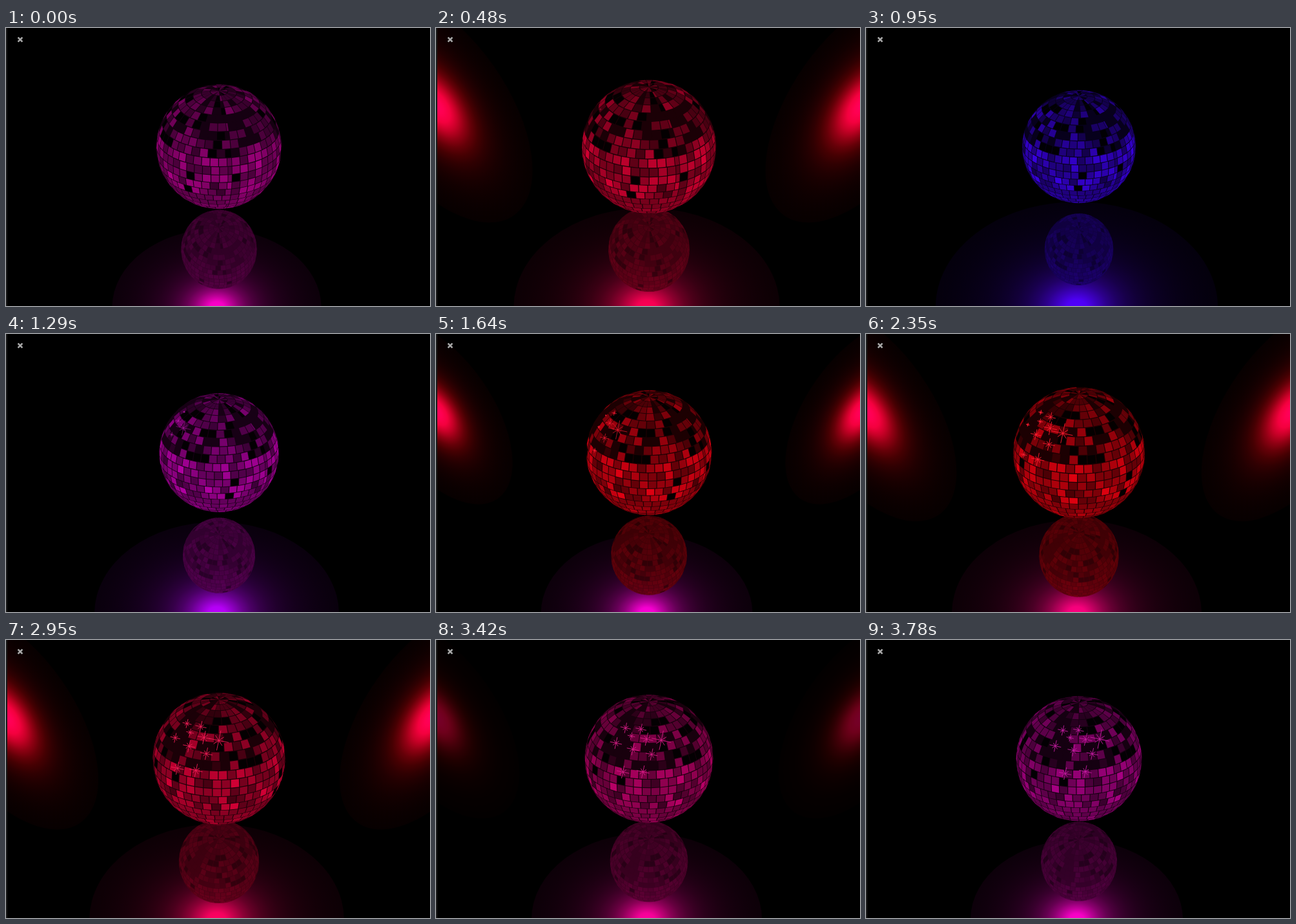
Write an HTML page that moves like this. It is 657x432 px and loops after 3.88 s.

```html
<!DOCTYPE html>
<html lang="en">
<head>
<meta charset="utf-8">
<title>Disco ball</title>
<style>
html, body { margin: 0; width: 100%; height: 100%; overflow: hidden; background: #000; }
svg { display: block; width: 657px; height: 432px; }
</style>
</head>
<body>
<svg viewBox="0 0 657 432">
  <defs>
    <radialGradient id="lampFill"></radialGradient>
    <radialGradient id="beamFill"></radialGradient>
  </defs>
  <rect width="657" height="432" fill="#000"/>
  <g id="beams">
    <ellipse class="beam" rx="208" ry="108" fill="url(#beamFill)"/>
    <ellipse class="beam" rx="208" ry="108" fill="url(#beamFill)"/>
  </g>
  <ellipse id="lamp" cx="326.5" cy="434" fill="url(#lampFill)"/>
  <g id="mirror" opacity=".86"></g>
  <g id="ball"></g>
  <path id="sparks" fill="none" stroke-width=".9" stroke-linecap="round"/>
  <rect width="2" height="432" fill="#1a1a1a"/>
  <path d="M18.6 14.6l6.8 6.8m0-6.8l-6.8 6.8" stroke="#a8a8a8" stroke-width="2.6"/>
</svg>
<script>
const NS = 'http://www.w3.org/2000/svg';
const LOOP = 3880, STEPS = 33, SPIN = 3.87;
const LEVELS = 10, ROWS = 22, SEAM = 12;
const BALL_TILT = rad(27), MIRROR_TILT = rad(57);

// beat: step, ball radius, ball hue, lamp hue
const BEATS = [
  [0, 97, 313, 312],
  [4, 104, 346, 340],
  [8, 88, 255, 259],
  [14, 97.3, 355, 309],
  [20, 102, 356, 330],
  [25, 102.6, 345, 337],
  [32, 97.4, 313, 312]
];

const $ = id => document.getElementById(id);
const clamp = v => Math.max(0, Math.min(1, v));
const bump = (x, mid, width) => Math.exp(-(((x - mid) / width) ** 2));

function rad(a) { return a * Math.PI / 180; }

function hash(a, b) {
  const v = Math.sin(a * 127.1 + b * 311.7) * 43758.5453;
  return v - Math.floor(v);
}

// hues from blue over magenta to red, so green stays empty
function tint(hue, power) {
  const red = clamp((hue - 240) / 60), blue = clamp((360 - hue) / 60);
  return [red * power, blue * power];
}
const rgb = ([red, blue], m = 1) => `rgb(${Math.round(red * m)},0,${Math.round(blue * m)})`;

function add(parent, tag, attrs = {}) {
  return set(parent.appendChild(document.createElementNS(NS, tag)), attrs);
}

function set(el, attrs) {
  for (const k in attrs) el.setAttribute(k, attrs[k]);
  return el;
}

// brightness of one mirror tile; the upper half has dark streaks
function shade(lat, lon, row, col) {
  const a = hash(row, col), b = hash(col + 7, row + 31);
  if (lat > 16) {
    const streak = .38 * hash(Math.floor(lon / 9), 5);
    const dark = .18 + streak + .5 * bump(lon, -142, 28) + .25 * bump(lon, 8, 20);
    return a < dark ? b * .2 : (.32 + .55 * b) * (1 - lat / 250);
  }
  if (lat < -28) return .5 + .25 * a;
  if (a < .04) return 0;
  return a < .3 ? .36 + .2 * b : .55 + .42 * b;
}

function makeTiles() {
  const list = [], pitch = 180 / ROWS;
  for (let row = 0; row < ROWS; row++) {
    const lat = -90 + (row + .5) * pitch;
    const step = Math.min(7.9 / Math.cos(rad(lat)), 16);
    for (let at = 0, col = 0; at < 359; at += step, col++) {
      const width = Math.min(step, 360 - at);
      const lon = (SEAM + at + width / 2 + 180) % 360 - 180;
      const level = Math.round(shade(lat, lon, row, col) * (LEVELS - 1));
      list.push({ lat, lon, w: width * .455, h: pitch * .455, level });
    }
  }
  return list;
}
const tiles = makeTiles();

// one large star, the rest scattered near it
const stars = [{ lon: -97, lat: 43, size: .15 }];
for (let i = 1; i < 10; i++) {
  stars.push({ lon: -155 + 60 * hash(i, 3), lat: -10 + 75 * hash(i, 8), size: .05 + .05 * hash(i, 1) });
}

// unit sphere point with the pole leaning towards the viewer
function project(lat, lon, tilt) {
  const p = rad(lat), l = rad(lon), c = Math.cos(tilt), s = Math.sin(tilt);
  const y = Math.sin(p), z = Math.cos(p) * Math.cos(l);
  return [Math.cos(p) * Math.sin(l), z * s - y * c, y * s + z * c];
}

function makeSphere(id, tilt, base, light) {
  const disc = add($(id), 'ellipse');
  const paths = Array.from({ length: LEVELS }, () => add($(id), 'path'));
  return (cx, cy, rx, ry, spin, color) => {
    const d = Array(LEVELS).fill('');
    for (const t of tiles) {
      const lon = t.lon + spin;
      if (project(t.lat, lon, tilt)[2] < 0) continue;
      const pts = [[-1, -1], [1, -1], [1, 1], [-1, 1]].map(([u, v]) => {
        const [x, y] = project(t.lat + v * t.h, lon + u * t.w, tilt);
        return (cx + x * rx).toFixed(1) + ' ' + (cy + y * ry).toFixed(1);
      });
      d[t.level] += 'M' + pts.join('L') + 'z';
    }
    set(disc, { cx, cy, rx: rx - .5, ry: ry - .5, fill: rgb(color, base) });
    paths.forEach((p, i) => set(p, { d: d[i], fill: rgb(color, light(i / (LEVELS - 1))) }));
  };
}
const drawBall = makeSphere('ball', BALL_TILT, .13, v => .02 + .98 * v);
const drawMirror = makeSphere('mirror', MIRROR_TILT, .32, v => .24 + .26 * Math.sqrt(v));

// soft light that falls off with distance u from its core
function makeGlow(id, core, power) {
  return Array.from({ length: 15 }, (_, i) => {
    const u = i / 14;
    const alpha = Math.min(1, 1.06 / (1 + (u / core) ** power));
    return { u, el: add($(id), 'stop', { offset: u, 'stop-opacity': alpha }) };
  });
}
const lampGlow = makeGlow('lampFill', .22, 2);
for (const { u, el } of makeGlow('beamFill', .3, 3)) {
  set(el, { 'stop-color': rgb([255, 95 * Math.max(.08, 1 - 2.2 * u)]) });
}

function starPath(spin, r, cx, cy) {
  let d = '';
  for (const { lon, lat, size } of stars) {
    const [x, y, z] = project(lat, lon + spin, BALL_TILT);
    const reach = size * r * clamp((z - .35) * 2.4);
    if (!reach) continue;
    for (let i = 0; i < 4; i++) {
      const a = rad(12 + i * 45), len = reach * (i % 2 ? .6 : 1);
      const dx = Math.cos(a) * len, dy = Math.sin(a) * len;
      d += `M${cx + x * r - dx} ${cy + y * r - dy}l${2 * dx} ${2 * dy}`;
    }
  }
  return d;
}

function beatAt(step) {
  const i = Math.max(1, BEATS.findIndex(b => b[0] >= step));
  const a = BEATS[i - 1], b = BEATS[i], f = (step - a[0]) / (b[0] - a[0]);
  return a.map((v, n) => v + (b[n] - v) * f);
}

function draw(step) {
  const [, r, hue, lampHue] = beatAt(step);
  const spin = SPIN * step;
  const color = tint(hue, 165 + 55 * clamp(Math.abs(hue - 313) / 42));

  drawBall(330, 184.4, r, r, spin, color);
  drawMirror(330, 344, r * .606, r * .635, spin, color);

  const wide = 162 + 6.3 * Math.abs(r - 97);
  set($('lamp'), { rx: wide, ry: wide * .75 });
  for (const { el } of lampGlow) set(el, { 'stop-color': rgb(tint(lampHue, 255)) });

  // side beams join in when the ball turns red
  const size = 1 + (r - 104) * .031;
  set($('beams'), { opacity: clamp((hue - 313) / 30) });
  document.querySelectorAll('.beam').forEach((el, i) => set(el, {
    transform: `translate(${i ? 659 : 1} 121) scale(${i ? -size : size} ${size}) rotate(55)`
  }));

  const [red, blue] = color;
  set($('sparks'), {
    d: starPath(spin, r, 330, 184.4),
    stroke: `rgb(${red + 35},30,${blue + 35})`,
    opacity: clamp(step / 20) * clamp((hue - 270) / 40)
  });
}

let shown = -1;
function tick() {
  const t = performance.now() % LOOP / LOOP;
  const step = Math.min(STEPS - 1, Math.floor(t * STEPS + .1));
  if (step !== shown) draw(shown = step);
  requestAnimationFrame(tick);
}
tick();
</script>
</body>
</html>
```
